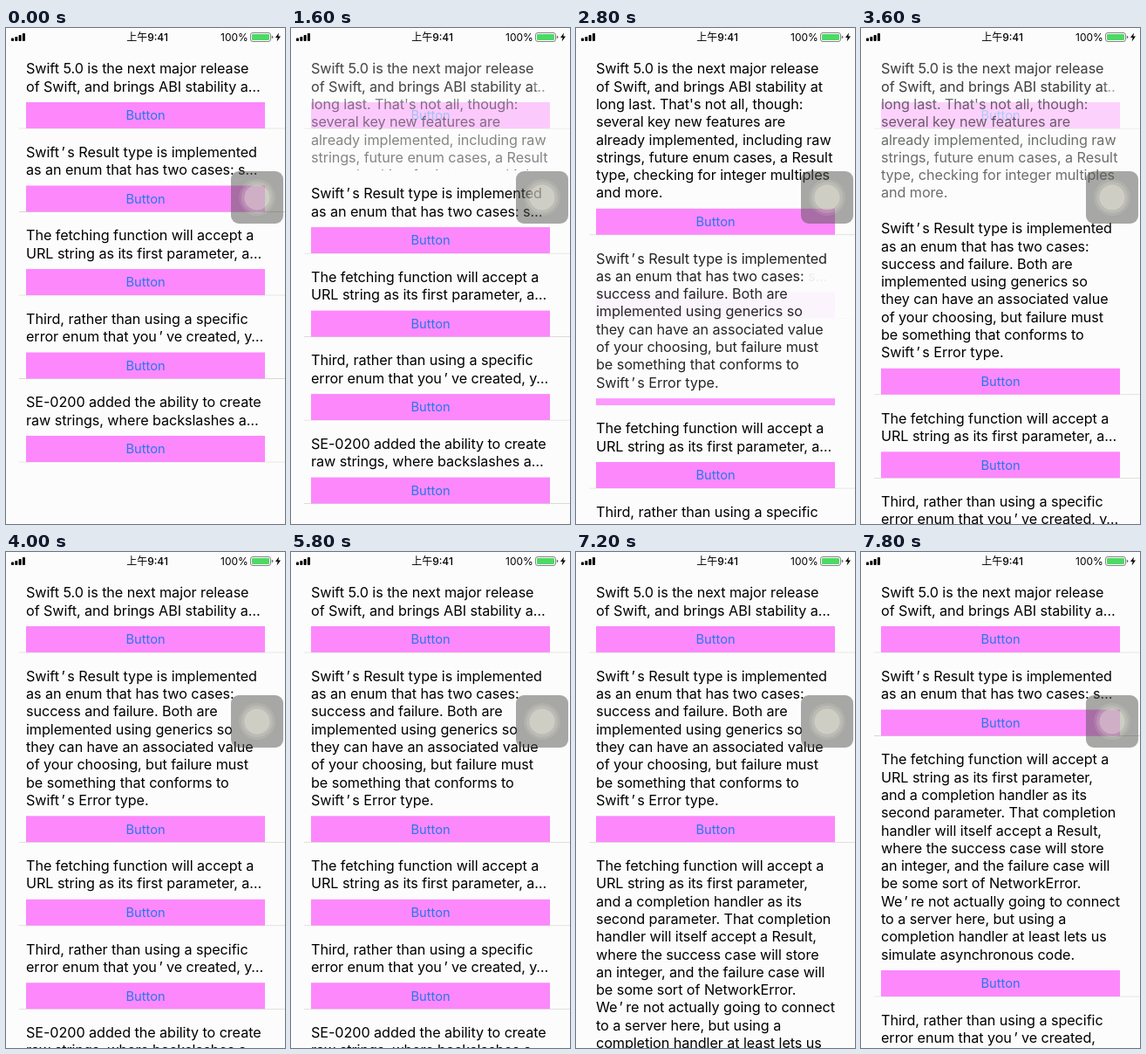
Animation of 320 by 568 pixels, one loop 8000 ms. Source, as an HTML page:

```html
<!DOCTYPE html>
<html lang="en">
<head>
<meta charset="utf-8">
<title>Expandable list</title>
<style>
  html, body { margin: 0; width: 100%; height: 100%; overflow: hidden; background: #fcfcfd; }
  #stage { display: block; width: 320px; height: 568px; }
  text { font-family: Inter, "Noto Sans CJK SC", "Noto Sans CJK", sans-serif; fill: #000; }
  .body { font-size: 16.2px; letter-spacing: -.07px; }
  .btn { font-size: 14.7px; fill: #2678ea; text-anchor: middle; }
  .bar { font-size: 12px; }
</style>
</head>
<body>
<svg id="stage" viewBox="0 0 320 568">
  <rect width="320" height="568" fill="#fcfcfd"/>
  <g id="list"></g>

  <g id="status">
    <rect x="6" y="11.5" width="3" height="3.5" rx=".8"/>
    <rect x="10.3" y="10" width="3" height="5" rx=".8"/>
    <rect x="14.6" y="8" width="3" height="7" rx=".8"/>
    <rect x="18.9" y="6" width="3" height="9" rx=".8"/>
    <text class="bar" x="162" y="14.5" text-anchor="middle" font-weight="500">上午9:41</text>
    <text class="bar" x="246" y="14.5">100%</text>
    <rect x="280.5" y="5.5" width="23" height="10" rx="2.5" fill="none" stroke="#666" stroke-width=".8"/>
    <rect x="282" y="7" width="20" height="7" rx="1.2" fill="#4cd964"/>
    <path d="M304.8 8.8q1.6 .3 1.6 1.7t-1.6 1.7z" fill="#666"/>
    <path d="M313 5.5l-4 5.6h2.6l-.9 4.4 4.3-5.9h-2.7z"/>
  </g>

  <g id="assist">
    <rect x="258" y="164" width="60" height="60" rx="9" fill="#55554e" opacity=".5"/>
    <g fill="#fbfaec">
      <circle cx="288" cy="194" r="21" opacity=".1"/>
      <circle cx="288" cy="194" r="18" opacity=".15"/>
      <circle cx="288" cy="194" r="14.5" opacity=".3"/>
    </g>
  </g>
</svg>
<script>
const LOOP = 8000, STEP = 200, LINE = 20.3, TOP = 20;

const cells = [
  { short: "Swift 5.0 is the next major release|of Swift, and brings ABI stability a…",
    long: "Swift 5.0 is the next major release|of Swift, and brings ABI stability at|long last. That's not all, though:|several key new features are|already implemented, including raw|strings, future enum cases, a Result|type, checking for integer multiples|and more." },
  { short: "Swift’s Result type is implemented|as an enum that has two cases: s…",
    long: "Swift’s Result type is implemented|as an enum that has two cases:|success and failure. Both are|implemented using generics so|they can have an associated value|of your choosing, but failure must|be something that conforms to|Swift’s Error type." },
  { short: "The fetching function will accept a|URL string as its first parameter, a…",
    long: "The fetching function will accept a|URL string as its first parameter,|and a completion handler as its|second parameter. That completion|handler will itself accept a Result,|where the success case will store|an integer, and the failure case will|be some sort of NetworkError.|We’re not actually going to connect|to a server here, but using a|completion handler at least lets us|simulate asynchronous code." },
  { short: "Third, rather than using a specific|error enum that you’ve created, y…",
    long: "Third, rather than using a specific|error enum that you’ve created,|you can also use the general Error|type. In fact, the Swift Evolution|proposal says that most uses of|Result will use Swift.Error." },
  { short: "SE-0200 added the ability to create|raw strings, where backslashes a…" }
];

// [cell, start, duration, open]
const taps = [
  [0, 1344, 600, 1], [1, 2365, 600, 1], [0, 3390, 600, 0],
  [2, 4770, 500, 1], [2, 5290, 500, 0],
  [3, 5960, 600, 1], [2, 6590, 600, 1], [1, 7195, 595, 0]
];

function add(parent, tag, attrs, text) {
  const el = document.createElementNS("http://www.w3.org/2000/svg", tag);
  for (const k in attrs) el.setAttribute(k, attrs[k]);
  if (text) el.textContent = text;
  return parent.appendChild(el);
}

// The curly apostrophe is set wide, with air on both sides
function addLine(parent, y, line) {
  const text = add(parent, "text", { class: "body", x: 23, y });
  const [head, tail] = line.split("’");
  add(text, "tspan", {}, head);
  if (tail) {
    add(text, "tspan", { dx: 2.5 }, "’");
    add(text, "tspan", { dx: 4 }, tail);
  }
}

const heightFor = n => 54.9 + n * LINE;

function buildLayer(parent, copy) {
  const lines = copy.split("|"), h = heightFor(lines.length);
  const g = add(parent, "g", {});
  add(g, "rect", { x: 15, y: h - .7, width: 305, height: .7, fill: "#c9c9b8" });
  add(g, "rect", { x: 23, y: h - 30.5, width: 274, height: 30, fill: "#fc88fc" });
  add(g, "text", { class: "btn", x: 160, y: h - 10.2 }, "Button");
  lines.forEach((s, i) => addLine(g, 32.3 + i * LINE, s));
  return { g, h };
}

const list = document.getElementById("list");
const rows = cells.map(c => {
  const box = add(list, "svg", { width: 320, overflow: "hidden" });
  return { box, small: buildLayer(box, c.short), big: c.long && buildLayer(box, c.long) };
});

function ease(u) {
  u = Math.min(1, Math.max(0, u));
  return u * u * (3 - 2 * u);
}

// How far a cell is open, and how opaque its two layers are
function stateAt(i, t) {
  let size = 0, bigAlpha = 0, smallAlpha = 1;
  for (const [cell, start, dur, open] of taps) {
    if (cell !== i || t < start) continue;
    const p = ease((t - start) / dur);
    const fadeIn = Math.pow(p, .8), fadeOut = Math.pow(1 - p, 1.7);
    size = open ? p : 1 - p;
    [bigAlpha, smallAlpha] = open ? [fadeIn, fadeOut] : [fadeOut, fadeIn];
  }
  return { size, bigAlpha, smallAlpha };
}

function draw(t) {
  let y = TOP;
  rows.forEach(({ box, small, big }, i) => {
    const { size, bigAlpha, smallAlpha } = stateAt(i, t);
    const h = big ? small.h + (big.h - small.h) * size : small.h;
    box.setAttribute("y", y);
    box.setAttribute("height", h);
    small.g.setAttribute("opacity", smallAlpha);
    if (big) big.g.setAttribute("opacity", bigAlpha);
    y += h;
  });
}

const begin = performance.now();
function tick() {
  const t = (performance.now() - begin) % LOOP;
  draw(Math.floor(t / STEP) * STEP);
  requestAnimationFrame(tick);
}
draw(0);
requestAnimationFrame(tick);
</script>
</body>
</html>
```
